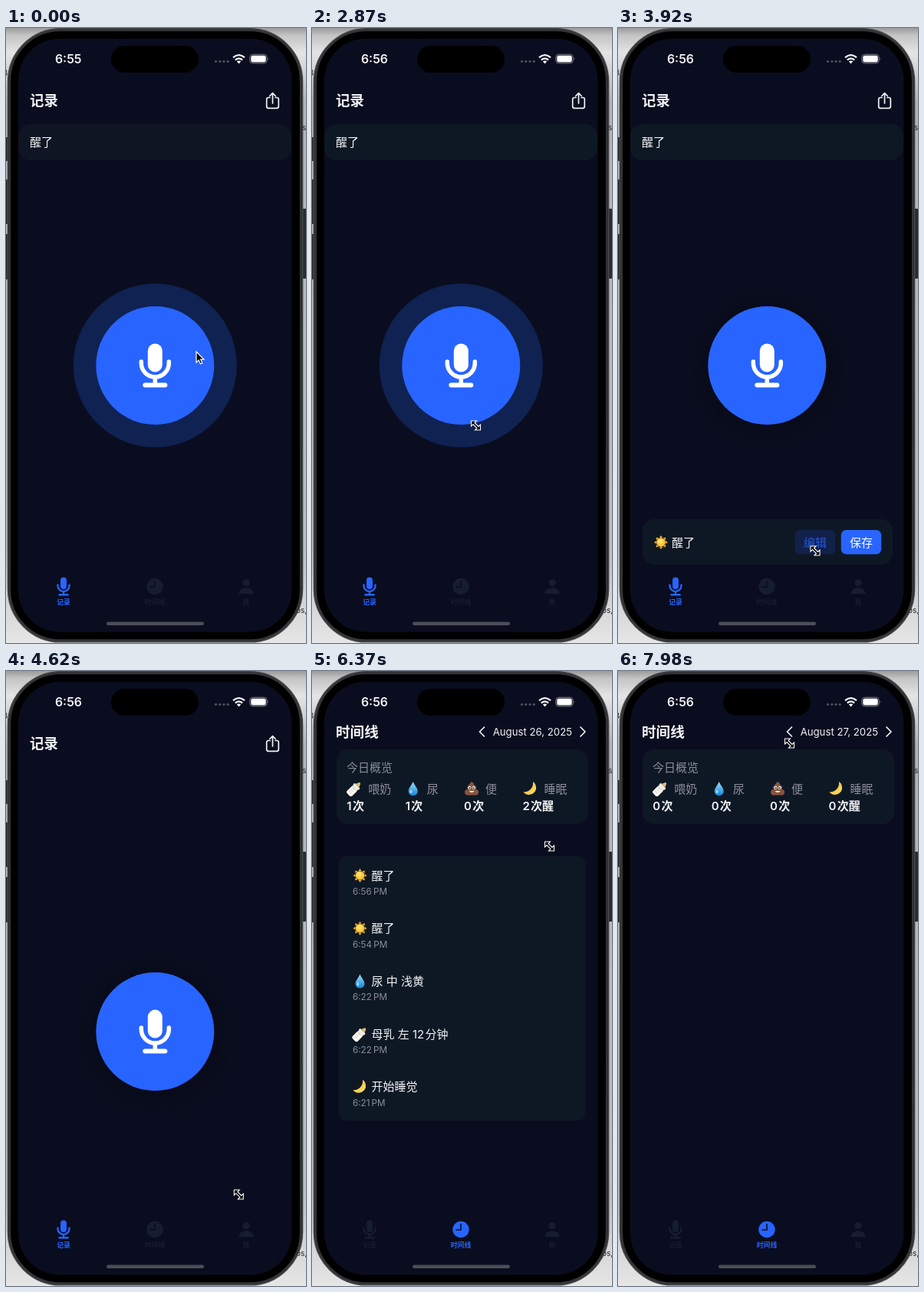
Animation of 391 by 800 pixels, one loop 8 s. Source, as an HTML page:

```html
<!DOCTYPE html>
<html lang="zh">
<head>
<meta charset="utf-8">
<style>
html, body { margin: 0; width: 100%; height: 100%; overflow: hidden; background: #c9c9c9; }
svg { display: block; width: 100vw; height: 100vh; }
text { font-family: Inter, 'Noto Sans CJK SC', 'Noto Sans CJK', sans-serif; white-space: pre; }
</style>
</head>
<body>
<svg id="stage" viewBox="0 0 391 800"></svg>
<script>
const LOOP = 8000;
const BLUE = '#2864ff', WHITE = '#f2f3f6', GREY = '#8b8e98', SCREEN = '#0a0d1f', CARD = '#0e1825', DIM = '#171d30';

const text = (x, y, s, size = 15, fill = WHITE, weight = 400, extra = '') =>
  `<text x="${x}" y="${y}" font-size="${size}" fill="${fill}" font-weight="${weight}" ${extra}>${s}</text>`;
const box = (x, y, w, h, r, fill, extra = '') =>
  `<rect x="${x}" y="${y}" width="${w}" height="${h}" rx="${r}" fill="${fill}" ${extra}/>`;
const icon = (id, x, y, scale = 1) => `<use href="#${id}" transform="translate(${x} ${y}) scale(${scale})"/>`;
const mid = 'text-anchor="middle"';

const rays = [...Array(8)].map((_, i) =>
  `<path d="M-2.1-6.1L0-9 2.1-6.1Z" transform="rotate(${i * 45})"/>`).join('');

const defs = `<defs>
  <linearGradient id="wall" x2="0" y2="1">
    <stop stop-color="#9a9a9a"/><stop offset=".012" stop-color="#c4c4c4"/>
    <stop offset=".04" stop-color="#e4e4e4"/><stop offset=".12" stop-color="#b4b4b4"/>
    <stop offset=".85" stop-color="#bebebe"/><stop offset="1" stop-color="#e6e6e6"/>
  </linearGradient>
  <radialGradient id="shade"><stop offset=".65" stop-color="#04060f" stop-opacity=".38"/>
    <stop offset="1" stop-color="#04060f" stop-opacity="0"/></radialGradient>
  <linearGradient id="water" x2="0" y2="1"><stop stop-color="#9be0fb"/><stop offset="1" stop-color="#1485d6"/></linearGradient>
  <linearGradient id="gold" x2="1" y2="1"><stop stop-color="#f5b52c"/><stop offset="1" stop-color="#ffe06a"/></linearGradient>
  <g id="mic" fill="currentColor" stroke="currentColor" stroke-linecap="round">
    <rect x="-9.5" y="-28.5" width="19" height="37" rx="9.5" stroke="none"/>
    <path d="M-18-5V-3A18 18 0 0 0 18-3V-5M0 17V25" fill="none" stroke-width="5.5"/>
    <path d="M-13 25.5H13" stroke-width="6"/>
  </g>
  <g id="clock"><circle r="10.7" fill="currentColor"/>
    <path d="M0-7V.5H-6" fill="none" stroke="${SCREEN}" stroke-width="1.6" stroke-linecap="round"/></g>
  <g id="person" fill="currentColor"><circle cy="-5" r="4.6"/><path d="M-9.5 9.5C-9.5-1 9.5-1 9.5 9.5Z"/></g>
  <g id="sun"><g fill="#f7a928">${rays}</g><circle r="5.8" fill="#ffc83a"/><circle cx="-1" cy="-1.5" r="3.3" fill="#ffdc68"/></g>
  <g id="drop"><path d="M0-9C2-4 6-1 6 3.5A6 5.7 0 0 1-6 3.5C-6-1-2-4 0-9Z" fill="url(#water)"/>
    <ellipse cx="-2.6" cy="4" rx="1.2" ry="2.3" fill="#d5f3ff" opacity=".75"/></g>
  <g id="moon"><path d="M3.500-9A9.300 9.300 0 1 1-9 4.500C-1 4.500 4.500-1.500 3.500-9Z" fill="url(#gold)"/></g>
  <g id="bottle" transform="rotate(45)">
    <rect x="-4.6" y="-3" width="9.2" height="14" rx="2.6" fill="#e9e6de"/>
    <path d="M-4.6 1H4.6V8.300Q4.600 11 2 11H-2Q-4.600 11-4.600 8.300Z" fill="#fdf9ee"/>
    <path d="M-2.4 1H1M-2.4 4H1M-2.4 7H1" stroke="#a9adb0" stroke-width=".8"/>
    <rect x="-5" y="-5.4" width="10" height="3.4" rx="1" fill="#f1eee6"/>
    <path d="M-3.2-5.4C-2.5-8-1.8-7-1.6-9.6Q0-11.5 1.6-9.6C1.8-7 2.5-8 3.2-5.4Z" fill="#dfb876"/></g>
  <g id="pile" fill="#88533d">
    <path d="M-1-9C3-8 4-5 3-3H-4C-5-6-1-6-1-9Z"/>
    <rect x="-6" y="-4.5" width="12" height="7" rx="3.5"/><rect x="-9" y="1" width="18" height="7.5" rx="3.7"/>
    <g fill="#fff"><circle cx="-2.6" cy="-1.2" r="2"/><circle cx="2.6" cy="-1.2" r="2"/><path d="M-3.5 3H3.5Q0 7-3.5 3Z"/></g>
    <g fill="#2b1a14"><circle cx="-2.4" cy="-1.1" r="1"/><circle cx="2.4" cy="-1.1" r="1"/></g></g>
</defs>`;

const phone = `
  <rect width="391" height="800" fill="url(#wall)"/>
  ${text(-4, 62, '3', 10, '#222')}${text(386, 133, 's', 10, '#222')}${text(378, 761, 'os,', 10, '#222')}
  ${[[142, 31], [197, 58], [268, 59]].map(([y, h]) => box(-1, y, 5, h, 1, '#2b2b2c')).join('')}
  ${box(385, 235, 6, 91, 1, '#2b2b2c')}
  ${box(2.5, .8, 384, 798, 69, '#161617', 'stroke="#48494b" stroke-width="1.6"')}
  ${box(4.8, 3, 379.4, 793.6, 66, '#000', 'stroke="#343537" stroke-width="2.6"')}
  ${box(16, 14, 356.5, 771.5, 54, SCREEN)}
  ${box(137, 23, 114, 35, 17.5, '#000')}`;

const status = `
  ${text(64, 45.8, '6:55', 15.8, WHITE, 600, 'id="time"')}
  ${[273.5, 278.8, 284, 289.2].map(x => `<circle cx="${x}" cy="43.5" r="1.6" fill="#50535f"/>`).join('')}
  <g fill="none" stroke="${WHITE}" stroke-width="2.3">
    <path d="M296 38.4Q303.5 31.8 311 38.4M298.8 41.6Q303.5 37.6 308.2 41.6"/></g>
  <path d="M300.8 43.6Q303.5 41.4 306.2 43.6L303.5 46.6Z" fill="${WHITE}"/>
  ${box(317.8, 34.3, 22.4, 11.6, 3.8, 'none', 'stroke="#7d8089"')}${box(319.3, 35.8, 19.4, 8.6, 2.5, '#fff')}
  <path d="M341.6 38.2Q343.3 40 341.6 41.9Z" fill="#7d8089"/>`;

const record = `<g id="record">
  ${text(31, 101, '记录', 18.4, WHITE, 700)}
  <path d="M344 90.500H342Q339.700 90.500 339.700 92.800V102Q339.700 104.300 342 104.300H353Q355.300 104.300 355.300 102V92.800Q355.300 90.500 353 90.500H351M347.500 98V85M343.700 88.500L347.500 84.700 351.300 88.500"
    fill="none" stroke="${WHITE}" stroke-width="1.7" stroke-linecap="round" stroke-linejoin="round"/>
  <g id="note">${box(16, 125, 356, 47, 16, CARD, 'id="noteBox"')}${text(31, 154, '醒了')}</g>
  <g id="button" color="#fff">
    <circle id="shadow" cy="4" r="108" fill="url(#shade)"/>
    <circle id="halo" r="106.5" fill="#0f2252"/>
    <circle r="77" fill="${BLUE}"/>${icon('mic', 0, 0)}
  </g>
  <g id="toast">
    ${box(32, 639, 326, 59, 15, CARD)}${icon('sun', 56, 669)}${text(70, 674.5, '醒了')}
    ${box(230.7, 653, 52.5, 31.5, 6.5, '#12214a')}${text(257, 674.5, '编辑', 15, '#2458de', 400, mid)}
    ${box(290.7, 653, 52.5, 31.5, 6.5, BLUE)}${text(317, 674.5, '保存', 15, '#fff', 500, mid)}
  </g></g>`;

const stats = [['bottle', '喂奶'], ['drop', '尿'], ['pile', '便'], ['moon', '睡眠']];
const counts = { 26: ['1次', '1次', '0次', '2次醒'], 27: ['0次', '0次', '0次', '0次醒'] };
const rows = [['sun', '醒了', '6:56'], ['sun', '醒了', '6:54'], ['drop', '尿 中 浅黄', '6:22'],
  ['bottle', '母乳 左 12\u200a分钟', '6:22'], ['moon', '开始睡觉', '6:21']];

const timeline = `<g id="timeline">
  ${text(31, 86, '时间线', 18.6, WHITE, 700)}
  ${text(339, 84, '', 13.2, WHITE, 400, 'id="date" text-anchor="end"')}
  <g fill="none" stroke="${WHITE}" stroke-width="1.7" stroke-linecap="round" stroke-linejoin="round">
    <path id="prev" d="M3-6L-3 0 3 6"/><path d="M350 73L356 79 350 85"/></g>
  ${box(32, 102, 328, 97, 15, CARD)}${text(45, 130.500, '今日概览', 15, GREY)}
  ${stats.map(([id, label], i) => {
    const x = 45.3 + i * 76.4;
    return icon(id, x + 10, 153) + text(x + 28, 158.5, label, 15, GREY) + text(x, 180.5, '', 15, WHITE, 600, 'class="count"');
  }).join('')}
  <g id="list">${box(35, 241, 321, 344, 9, CARD)}
  ${rows.map(([id, label, at], i) => {
    const y = 266 + i * 68.7;
    return icon(id, 62.5, y) + text(77.5, y + 5.5, label) + text(53, y + 25, at + '\u2009PM', 11.7, GREY);
  }).join('')}</g></g>`;

const tabs = [['mic', '记录', 75, .42], ['clock', '时间线', 194, 1], ['person', '我', 313, 1]].map(([id, label, x, s]) =>
  `<g class="tab">${icon(id, x, 726.5, s)}${text(x, 750, label, 8.8, 'currentColor', 600, mid)}</g>`).join('')
  + box(131, 772.5, 127, 4.6, 2.3, '#4b4d57');

const cursor = `<g id="cursor">
  <path id="arrow" d="M0 0V14L3.200 11 5.400 16 7.800 15 5.700 10.200H10Z" fill="#000" stroke="#fff" stroke-width="1.2"/>
  <path id="resize" d="M-6-6H1L-1.500-3.500 3.500 1.500 6-1V6H-1L1.500 3.500-3.500-1.500-6 1Z" fill="#000" stroke="#fff" stroke-width="1.1"/></g>`;

const stage = document.getElementById('stage');
stage.innerHTML = defs + phone + status + record + timeline + tabs + cursor;
const $ = id => document.getElementById(id);
const show = (id, on) => $(id).setAttribute('visibility', on ? 'inherit' : 'hidden');
const move = (id, x, y) => $(id).setAttribute('transform', `translate(${x} ${y})`);
const ramp = (t, a, b) => {
  const p = Math.min(1, Math.max(0, (t - a) / (b - a)));
  return p * p * (3 - 2 * p);
};

// time, x, y
const path = [[0, 248, 421], [420, 248, 421], [840, 242, 490], [980, 242, 490], [1540, 223.5, 602],
  [2590, 223.5, 602], [2870, 213.5, 517], [3120, 204, 452], [3430, 204, 452], [3920, 257, 680],
  [4270, 315, 674], [4500, 315, 674], [5110, 201, 742], [5810, 201, 742], [6370, 309.5, 228],
  [6720, 353, 82], [7200, 353, 82], [7840, 223.5, 94], [LOOP, 223.5, 94]];

function cursorAt(t) {
  const i = path.findIndex((p, k) => k && t <= p[0]);
  const [t0, x0, y0] = path[i - 1], [t1, x1, y1] = path[i];
  const p = ramp(t, t0, t1);
  return [x0 + (x1 - x0) * p, y0 + (y1 - y0) * p];
}

function draw(t) {
  const late = t >= 980, halo = t < 3290, saved = t >= 4410;
  const page = t >= 5810, day = t < 6930 ? 26 : 27;
  $('time').textContent = late ? '6:56' : '6:55';
  $('noteBox').setAttribute('fill', late ? CARD : '#101524');

  show('record', !page);
  show('timeline', page);
  show('note', !saved);
  show('halo', halo);
  show('shadow', !halo);
  move('button', 194.3, 439 + 35.5 * ramp(t, 4410, 4690));
  const toast = ramp(t, 3360, 3640) * (1 - ramp(t, 4410, 4620));
  $('toast').setAttribute('opacity', toast);
  move('toast', 0, 12 * (1 - toast));

  $('date').textContent = `August ${day}, 2025`;
  move('prev', day === 26 ? 221.5 : 223.5, 79);
  document.querySelectorAll('.count').forEach((el, i) => {
    el.textContent = counts[day][i].replace('次', '\u200a次');
  });
  show('list', day === 26);

  const active = t < 5740 ? 0 : 1;
  document.querySelectorAll('.tab').forEach((el, i) => el.setAttribute('color', i === active ? BLUE : DIM));

  move('cursor', ...cursorAt(t));
  show('arrow', !late);
  show('resize', late);
}

const start = performance.now();
function tick() {
  draw((performance.now() - start) % LOOP);
  requestAnimationFrame(tick);
}
tick();
</script>
</body>
</html>
```
